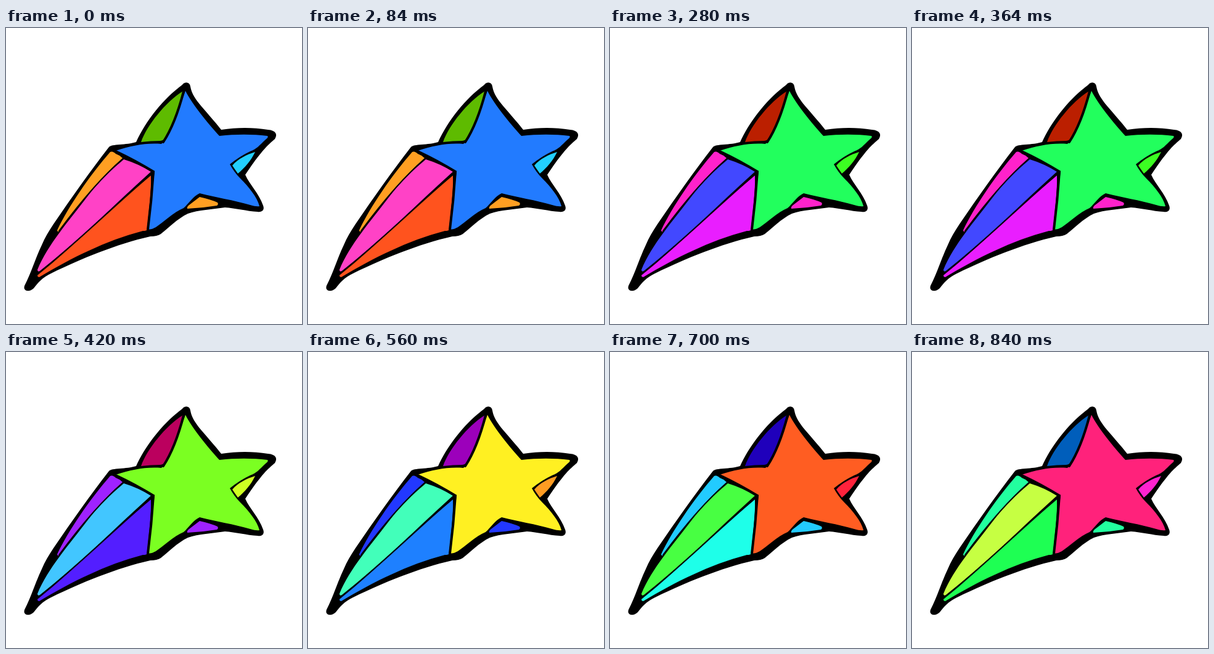
An HTML page that plays this animation: 480 by 480 pixels, repeating every 980 ms.

```html
<!DOCTYPE html>
<html lang="en">
<head>
<meta charset="utf-8">
<title>Shooting star</title>
<style>
  @property --turn {
    syntax: "<number>";
    inherits: true;
    initial-value: 0;
  }
  html, body { margin: 0; width: 100%; height: 100%; overflow: hidden; background: #fff; }
  svg {
    display: block;
    width: 100%;
    height: 100%;
    animation: hues 980ms steps(7, end) infinite;
  }
  /* Seven hard steps of 40 degrees, then back to the start */
  @keyframes hues {
    from { --turn: 0; }
    to { --turn: -280; }
  }
  .tint { fill: hsl(calc(var(--hue) + var(--turn)) 100% var(--light, 56.7%)); }
  .star { --hue: 216; }
  .top { --hue: 90; --light: 36.7%; }
  .right { --hue: 193; }
  .edge { --hue: 34; }
  .middle { --hue: 318; --light: 62.9%; }
  .low { --hue: 14; --light: 55.9%; }
  .ink { fill: none; stroke: #000; stroke-width: 4; stroke-linecap: round; }
  .thin { stroke-width: 2; }
</style>
</head>
<body>
<svg viewBox="0 0 480 480">
  <path d="M286 92C289 87 298 87 299 95C301 107 308 116 316 126C327 139 338 151 349 165
    C375 161 400 161 425 165C437 166 441 172 436 180C418 194 402 217 388 238
    C395 254 410 268 417 288C420 296 414 299 408 298C390 297 372 292 355 291
    C335 294 312 295 295 301C278 309 264 324 251 334Q245 338 234 338
    C180 350 120 375 75 397C58 405 52 413 45 422C38 429 27 427 30 418
    C41 397 47 375 58 352C63 340 69 330 77 318C107 274 136 233 167 193
    C171 188 195 190 211 185C227 150 255 115 286 92Z"/>
  <path class="tint star" d="M291 102C303 125 327 154 346 175C372 172 400 172 424 175
    Q426 177 422 180C410 191 407 196 396 200Q379 208 363 221
    Q370 234 380 244C394 258 407 274 411 289Q406 290 396 287
    C369 279 341 275 314 268C303 273 297 284 288 292C271 299 257 314 243 323
    Q234 328 230 326C234 297 237 265 241 232C221 222 199 212 178 199
    C203 191 226 186 252 188Q257 183 258 178C273 157 281 129 291 102Z"/>
  <path class="tint top" d="M286 103C286 124 276 146 268 164Q260 182 250 183Q235 183 219 185
    C228 158 260 119 286 103Z"/>
  <path class="tint right" d="M404 201C398 214 387 227 376 236Q371 229 367 223C376 212 391 205 404 201Z"/>
  <path class="tint edge" d="M314 274Q332 278 343 283Q345 286 342 288Q318 292 294 293Q293 290 297 287Z"/>
  <path class="tint edge" d="M169 201Q173 199 178 204Q184 206 189 211
    C153 243 119 283 87 329Q84 332 83 328C101 290 135 240 169 201Z"/>
  <path class="tint middle" d="M191 213Q214 220 235 233C174 288 117 346 55 394Q51 396 51 392
    C68 351 101 314 133 272C149 251 168 232 191 213Z"/>
  <path class="tint low" d="M235 239C236 268 231 298 229 327Q228 329 222 329
    C161 345 106 373 54 404Q51 404 51 401C116 349 173 289 235 239Z"/>
  <path class="ink" d="M288 103C281 130 272 159 255 185M178 200Q210 215 239 233Q236 280 230 327"/>
  <path class="ink thin" d="M190 212C153 243 120 283 86 329M237 236C174 289 116 348 53 397"/>
</svg>
</body>
</html>
```
